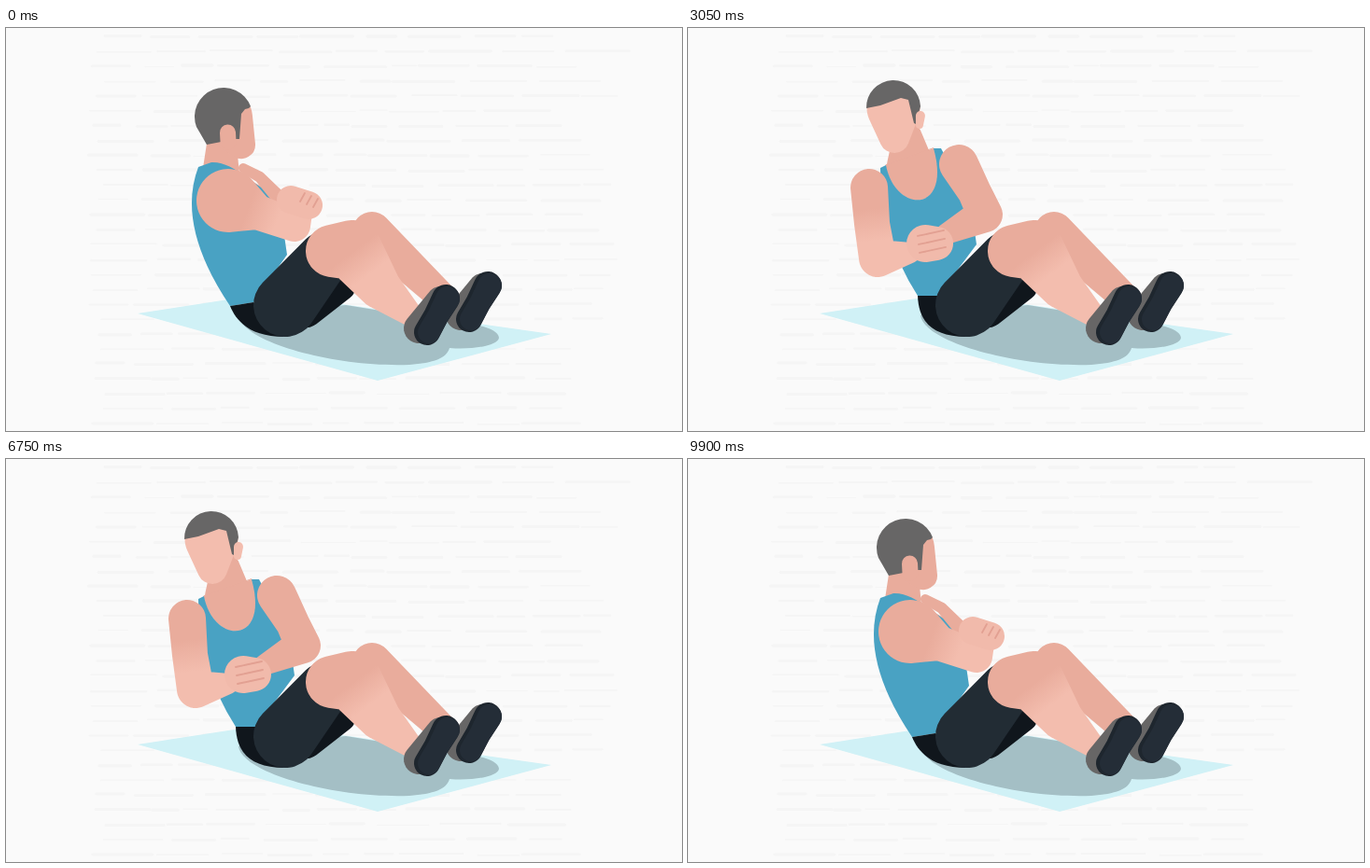
An HTML page for the animation above (9950 ms loop, 724x432 px).

```html
<!DOCTYPE html>
<html lang="en">
<head>
<meta charset="utf-8">
<title>Seated twist</title>
<style>
html, body { margin: 0; width: 100%; height: 100%; overflow: hidden; background: #fafafa; }
svg { display: block; width: 724px; height: 432px; }
</style>
</head>
<body>
<svg viewBox="0 0 724 432">
  <defs>
    <linearGradient id="armTone" gradientUnits="userSpaceOnUse">
      <stop offset=".3" stop-color="#e9ac9c"/><stop offset=".75" stop-color="#f3bdae"/>
    </linearGradient>
    <linearGradient id="legTone" gradientUnits="userSpaceOnUse" x1="374" y1="238" x2="392" y2="262">
      <stop offset="0" stop-color="#e9ac9c"/><stop offset="1" stop-color="#f3bdae"/>
    </linearGradient>
  </defs>
  <rect width="724" height="432" fill="#fafafa"/>
  <g id="streaks" fill="none" stroke="#f5f5f5" stroke-linecap="round"></g>
  <path fill="#d0f1f6" d="M141,306L280,284.5L584,328L398,378Z"/>
  <path fill="#a4bfc5" d="M249,308C252,336 350,364 432,361C458,359 472,354 475,343C498,345 527,341 528,332C527,322 505,317 488,317L364,297Z"/>
  <g id="figure" stroke-linecap="round"></g>
</svg>
<script>
const $ = id => document.getElementById(id);
const add = (parent, attrs) => {
  const el = parent.appendChild(document.createElementNS('http://www.w3.org/2000/svg', 'path'));
  set(el, attrs);
  return el;
};
const set = (el, attrs) => { for (const k in attrs) el.setAttribute(k, attrs[k]); };

const SKIN = '#e9ac9c', BLUE = '#49a2c3', GREY = '#676666', DARK = '#222c34', BLACK = '#10161c';

// Tapered limb: joints are x, y, radius; neighbours are joined by their outer tangents.
function limb(v) {
  let d = '';
  for (let i = 0; i + 5 < v.length; i += 3) {
    const [x, y, r, X, Y, R] = v.slice(i, i + 6);
    const a = Math.atan2(Y - y, X - x);
    const ratio = (r - R) / Math.hypot(X - x, Y - y);
    const b = Math.acos(Math.max(-0.99, Math.min(0.99, ratio)));
    const on = (cx, cy, q, t) => `${cx + q * Math.cos(t)},${cy + q * Math.sin(t)}`;
    const wide = +(b > Math.PI / 2);
    d += `M${on(x, y, r, a + b)}A${r} ${r} 0 ${1 - wide} 1 ${on(x, y, r, a - b)}`
      + `L${on(X, Y, R, a - b)}A${R} ${R} 0 ${wide} 1 ${on(X, Y, R, a + b)}Z`;
  }
  return d;
}

const pairs = v => v.flatMap((n, i) => i % 2 ? [] : [`${n},${v[i + 1]}`]);

// Torso points: strap, neckline curve, strap, armpit, hip, waist, side curve.
const chest = v => {
  const p = pairs(v);
  return `M${p[1]}C${p[2]} ${p[3]} ${p[4]}Z`;
};
const shirt = v => {
  const p = pairs(v);
  return `M${p[0]}L${p[1]}C${p[2]} ${p[3]} ${p.slice(4, 9).join('L')}L${p[9]}Q${p[10]} ${p[0]}Z`;
};
const seat = v => {
  const p = pairs(v);
  return `M${p[9]}L${p[8]}L298,331C262,331 247,315 ${p[9]}Z`;
};
// Crown is a half circle, the hairline a chain of points.
const hairCut = v => {
  const p = pairs(v);
  return `M${p[0]}A1 1 0 0 1 ${p.slice(1).join('L')}Z`;
};
// Three parallel strokes: start, end, step.
const fingers = ([x, y, X, Y, dx, dy]) => [-1, 0, 1].map(i =>
  `M${x + i * dx},${y + i * dy}L${X + i * dx},${Y + i * dy}`).join('');

const parts = [];
// One pose stays still; three poses are right, middle and left.
function part(shape, fill, ...poses) {
  const p = { shape, el: add($('figure'), { fill }), poses: poses.map(s => s.split(/[\s,]+/).map(Number)) };
  p.el.setAttribute('d', shape(p.poses[0]));
  if (poses.length > 1) parts.push(p);
  return p;
}

const torso = [
  '206,149 220,144 246,143 262,170 291,179 292,181 294,195 301,243 265,294 240,298 182,212',
  '203,151 217,148 224,187 315,200 261,139 268,140 298,183 304,238 265,292 243,293 193,222',
  '206,150 212,147 222,199 283,200 263,129 271,129 303,190 309,232 268,287 246,287 206,225'
];
const shoe = (dx, dy) => {
  const at = v => limb(v.map((n, i) => n + [dx, dy, 0][i % 3]));
  part(at, GREY, '442,322,16 464,289,12');
  part(at, '#1e262e', '471,290,15 461,308,13.5 451,326,14');
  part(at, '#242d37', '473,290,13 463,308,11.5 453,326,12');
};

part(limb, SKIN, '231,125,16 230,158,20', '232,125,19 234,155,24', '235,115,15 238,148,25');
set(part(chest, SKIN, ...torso).el, { stroke: SKIN, 'stroke-width': 1 });
part(shirt, BLUE, ...torso);
part(limb, SKIN,
  '254,150,5 272,160,6 294,184,8 305,192,8',
  '272,151,10 293,176,12 318,199,15 301,209,11',
  '290,146,21 307,176,18 318,200,19 276,221,11');
const arm = part(limb, 'url(#armTone)',
  '238,185,34 268,197,19 309,212,17 314,198,14',
  '216,180,27 229,210,21 252,243,17 282,218,14',
  '194,171,20 197,210,19 203,247,20 238,241,11');
part(limb, '#f1baab', '305,184,15 324,190,15', '285,203,16 294,214,18', '254,231,20 266,231,18');
set(part(fingers, 'none', '322,189 327,180 7,3', '286,213 308,209 2,9', '247,232 275,226 1,9').el,
  { stroke: '#e2a092', 'stroke-width': 1.8 });
const face = part(limb, SKIN, '234,96,30 252,125,15', '229,92,30 239,121,17', '220,86,28.5 221,118,16');
part(hairCut, GREY,
  '204,106 262,84 260,86 256,87 252,92 250,119 246,119 215,125',
  '199,102 257,82 258,86 248,90 220,93 218,116 214,116 206,119',
  '191,86 249,84 244,103 242,102 236,77 228,75 206,83 191,86');
const ear = part(limb, SKIN, '237.5,112,8.5 238,122,8.5', '211,109,5.5 211,114,4.5', '249,94,5 248,104,4');

part(limb, BLACK, '322,304,17 360,278,14');
part(limb, SKIN, '392,218,21 476,297,15');
shoe(45, -14);
part(seat, BLACK, ...torso);
part(limb, DARK, '299,297,34 341,246,28');
part(limb, 'url(#legTone)', '349,239,28 371,238,32 400,278,23 432,306,13');
shoe(0, 0);

// Seeded faint paper streaks
let seed = 7;
const rnd = () => (seed = seed * 16807 % 2147483647) / 2147483647;
for (let row = 0; row < 27; row++) {
  const y = 9 + row * 15.95, end = 580 + rnd() * 50;
  for (let x = 84 + rnd() * 24; x < end;) {
    const w = 25 + rnd() * 45;
    add($('streaks'), { d: `M${x},${y + rnd() * 2 - 1}h${w}`, 'stroke-width': 1.5 + rnd() * 2 });
    x += w + 3 + rnd() * 16;
  }
}

const LOOP = 9950, REP = 2000, MOVE = 500, BACK = 1040, MID = 0.216;
const mix = (a, b, k) => a.map((n, i) => n + (b[i] - n) * k);
const pose = ([a, b, c], s) => s < MID ? mix(a, b, s / MID) : mix(b, c, (s - MID) / (1 - MID));
const ease = k => { k = Math.min(1, Math.max(0, k)); return k * k * (3 - 2 * k); };

function draw(time) {
  const t = time % LOOP % REP;
  const s = t < BACK ? ease(t / MOVE) : 1 - ease((t - BACK) / MOVE);
  for (const p of parts) p.el.setAttribute('d', p.shape(pose(p.poses, s)));
  const fill = `rgb(${mix([233, 172, 156], [243, 189, 174], Math.sqrt(s))})`;
  for (const p of [face, ear]) set(p.el, { fill });
  const [x1, y1, , , , , x2, y2] = pose(arm.poses, s);
  set($('armTone'), { x1, y1, x2, y2 });
}

const start = performance.now();
function tick() {
  draw(performance.now() - start);
  requestAnimationFrame(tick);
}
draw(0);
requestAnimationFrame(tick);
</script>
</body>
</html>
```
